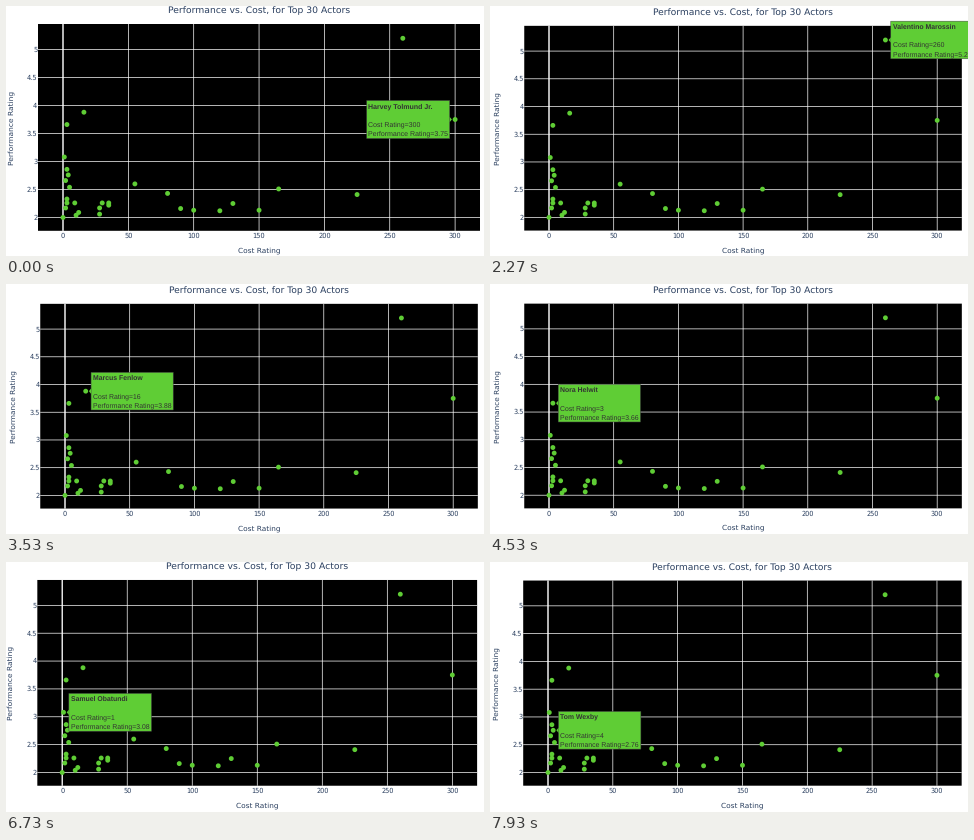
Write a matplotlib script that moves like this. It is 478x250 px and loops after 8000 ms.

```python
import matplotlib.pyplot as plt
from matplotlib.animation import FuncAnimation
from matplotlib.collections import EllipseCollection, LineCollection
from matplotlib.patches import Polygon, Rectangle

W, H, DPI = 478, 250, 100
STEP, LOOP = 20, 8000
GREEN, INK, HOVER_INK = "#5fcd35", "#2a3f5f", "#333333"
X_UNIT, Y_UNIT = 1.307, 56.0  # pixels per rating unit at scale 1

POINTS = [
    (0, 2.0), (1, 3.08), (2, 2.66), (3, 3.66), (3, 2.86), (4, 2.76),
    (5, 2.54), (3, 2.33), (3, 2.26), (2, 2.17), (9, 2.26), (10, 2.04),
    (12, 2.09), (16, 3.88), (28, 2.17), (28, 2.06), (30, 2.26), (35, 2.26),
    (35, 2.22), (55, 2.6), (80, 2.43), (90, 2.16), (100, 2.13), (120, 2.12),
    (130, 2.25), (150, 2.13), (165, 2.51), (225, 2.41), (260, 5.2), (300, 3.75),
]

# start ms, origin x, origin y, scale, cost, performance, name
SLIDES = [
    (0, 57, 211.5, 1.0, 300, 3.75, "Harvey Tolmund Jr."),
    (2270, 59, 211.4, 0.99, 260, 5.2, "Valentino Marossin"),
    (3400, 59, 211.4, 0.99, 16, 3.88, "Marcus Fenlow"),
    (4530, 59, 211.2, 0.99, 3, 3.66, "Nora Helwit"),
    (5670, 56.2, 210.5, 0.995, 1, 3.08, "Samuel Obatundi"),
    (6800, 57, 210.5, 0.994, 3, 2.86, "Alice Morvane"),
    (7930, 58, 210.5, 0.992, 4, 2.76, "Tom Wexby"),
]

plt.rcParams["text.hinting"] = "none"
fig = plt.figure(figsize=(W / DPI, H / DPI), dpi=DPI, facecolor="white")
ax = fig.add_axes([0, 0, 1, 1])
ax.set(xlim=(0, W), ylim=(H, 0))
ax.axis("off")


def pt(px):
    return px * 72 / DPI


def label(x, y, text, size, ha="center", font="DejaVu Sans", color=INK, **kw):
    """Horizontal text whose capitals are centred on y."""
    return ax.text(x, y + 0.36 * size, text, fontsize=pt(size), ha=ha,
                   va="baseline", family=font, color=color, **kw)


def box(x, y, w, h, color, zorder, **kw):
    return ax.add_patch(Rectangle((x, y), w, h, facecolor=color, snap=False,
                                  zorder=zorder, **kw))


def lines(segments, width):
    return ax.add_collection(LineCollection(
        segments, colors="white", linewidths=pt(width), snap=False,
        zorder=2.1))


def chart(x0, y0, s):
    def px(cost):
        return x0 + s * X_UNIT * cost

    def py(perf):
        return y0 - s * Y_UNIT * (perf - 2)

    left, right = x0 - 25 * s, x0 + 417 * s
    top, bottom = y0 - 193.5 * s, y0 + 13.3 * s
    mid = x0 + 196 * s
    costs = range(0, 301, 50)
    perfs = [2 + 0.5 * i for i in range(7)]

    parts = [box(left, top, right - left, bottom - top, "black", 2,
                 linewidth=0)]
    grid = [[(px(c), top), (px(c), bottom)] for c in costs]
    grid += [[(left, py(p)), (right, py(p))] for p in perfs]
    parts.append(lines(grid, 0.7))
    parts.append(lines(grid[:1], 1.1))

    size = [4.9 * s] * len(POINTS)
    parts.append(ax.add_collection(EllipseCollection(
        size, size, [0] * len(POINTS), units="xy",
        offsets=[(px(c), py(p)) for c, p in POINTS],
        offset_transform=ax.transData, facecolors=GREEN, linewidths=0,
        zorder=2.2)))

    parts.append(label(mid, y0 - 207.5 * s,
                       "Performance vs. Cost, for Top 30 Actors", 9.25 * s))
    parts.append(label(mid, y0 + 32.5 * s, "Cost Rating", 7.4 * s))
    parts.append(ax.text(x0 - 51.6 * s, y0 - 90 * s, "Performance Rating",
                         fontsize=pt(7.5 * s), rotation=90, ha="center",
                         va="center", family="DejaVu Sans", color=INK))
    parts += [label(px(c), y0 + 18.3 * s, f"{c}", 6.6 * s) for c in costs]
    parts += [label(left - 0.7, py(p), f"{p:g}", 6.6 * s, "right")
              for p in perfs]
    return parts, px, py


def hover(x, y, s, cost, perf, name):
    """Green tooltip beside a point, on the left for the costliest one."""
    side = -1 if cost == 300 else 1
    w, h = 83 * s, 38 * s
    edge = x + side * 5.4 * s
    left = edge if side > 0 else edge - w
    tip = Polygon([(x + side * 3.2 * s, y), (edge, y - 2.6), (edge, y + 2.6)],
                  facecolor=GREEN, linewidth=0, zorder=4)
    parts = [
        box(left, y - h / 2, w, h, GREEN, 4, edgecolor="#444444",
            linewidth=pt(0.5)),
        ax.add_patch(tip),
    ]
    rows = [(-13.9, name, "bold"), (4.6, f"Cost Rating={cost}", "normal"),
            (13.9, f"Performance Rating={perf:g}", "normal")]
    for dy, text, weight in rows:
        parts.append(label(left + 1.8, y + dy * s, text, 6.95 * s, "left",
                           "Liberation Sans", HOVER_INK, weight=weight,
                           zorder=5))
    return parts


def build(x0, y0, s, cost, perf, name):
    parts, px, py = chart(x0, y0, s)
    return parts + hover(px(cost), py(perf), s, cost, perf, name)


groups = [build(*slide[1:]) for slide in SLIDES]


def update(n):
    now = n * STEP + STEP / 2
    current = sum(slide[0] <= now for slide in SLIDES) - 1
    for i, group in enumerate(groups):
        for part in group:
            part.set_visible(i == current)
    return []


update(0)
anim = FuncAnimation(fig, update, frames=LOOP // STEP, interval=STEP,
                     init_func=lambda: update(0), repeat=True, repeat_delay=0)
plt.show()
```
